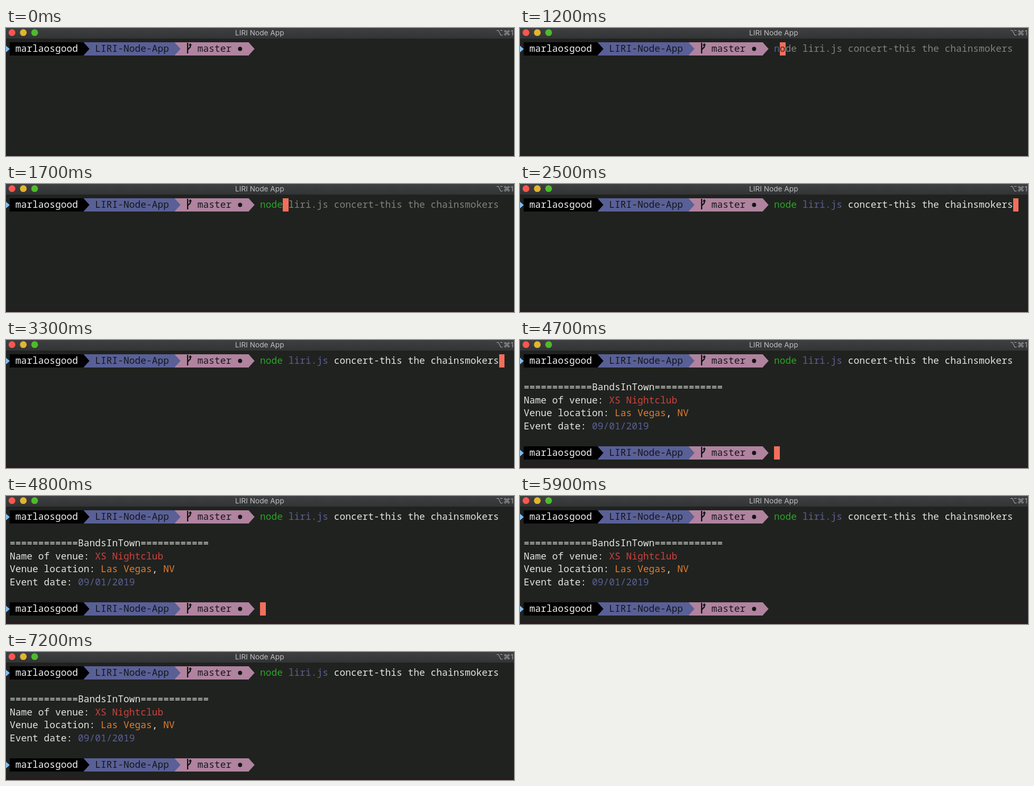
An HTML page with a canvas that plays this animation: 960 px wide and 242 px high, repeating every 7.3 s.

```html
<!DOCTYPE html>
<html lang="en">
<head>
<meta charset="utf-8">
<title>LIRI Node App</title>
<style>
html, body { margin: 0; width: 100%; height: 100%; overflow: hidden; background: #20221f; }
canvas { display: block; }
</style>
</head>
<body>
<canvas id="stage" width="960" height="242"></canvas>
<script>
const g = document.getElementById('stage').getContext('2d');
const LOOP = 7300, LEFT = 7, TOP = 27, CELL = 10.75, ROW = 24.85, INPUT = 44;
const MONO = '17.9px "Noto Sans Mono", "DejaVu Sans Mono", monospace';
const BG = '#20221f', WHITE = '#e4e5e0', GREY = '#80827f', BLUE = '#596096',
  PINK = '#b0839f', GREEN = '#2da32b', RED = '#c9433f', ORANGE = '#e27c2b', CURSOR = '#f16f5d';
const USER = 'marlaosgood';
const COMMAND = 'node liri.js concert-this the chainsmokers';

// [time in ms, characters typed]
const KEYS = [[1200, 1], [1400, 2], [1500, 3], [1600, 4], [1800, 5], [2400, COMMAND.length]];
const ENTER = 3500, OUTPUT = 4700;
const BLINKS = [[0, 100], [600, 1100], [5900, 6400], [6900, LOOP]];

const colX = col => LEFT + col * CELL;
const rowY = row => Math.round(TOP + row * ROW);

function rect(x, y, w, h, color) {
  g.fillStyle = color;
  g.fillRect(x, y, w, h);
}

function dot(x, y, r, color) {
  g.fillStyle = color;
  g.beginPath();
  g.arc(x, y, r, 0, Math.PI * 2);
  g.fill();
}

function triangle(x, y, w, h, color) {
  g.fillStyle = color;
  g.beginPath();
  g.moveTo(x, y);
  g.lineTo(x + w, y + h / 2);
  g.lineTo(x, y + h);
  g.fill();
}

function text(str, col, row, color) {
  g.font = MONO;
  g.textAlign = 'left';
  g.fillStyle = color;
  [...str].forEach((ch, i) => g.fillText(ch, colX(col + i), rowY(row) + 18));
}

// Consecutive [string, color] pieces on one row
function line(row, ...parts) {
  let col = 0;
  for (const [str, color] of parts) {
    text(str, col, row, color);
    col += str.length;
  }
}

function segment(from, to, row, color) {
  const x = Math.round(colX(from)), y = rowY(row);
  rect(x, y, Math.round(colX(to)) - x, rowY(row + 1) - y, color);
}

function branch(x, y) {
  g.strokeStyle = g.fillStyle = '#141414';
  g.lineWidth = 2.4;
  g.beginPath();
  g.moveTo(x + 3, y + 1);
  g.lineTo(x + 3, y + 21);
  g.moveTo(x + 8, y + 5);
  g.lineTo(x + 8, y + 9);
  g.lineTo(x + 3, y + 14);
  g.stroke();
  g.beginPath();
  g.moveTo(x + 4.8, y + 6);
  g.lineTo(x + 8, y + 1.5);
  g.lineTo(x + 11.2, y + 6);
  g.fill();
}

function prompt(row) {
  const y = rowY(row);
  triangle(0, y + 6.5, 7, 12.5, '#7fbdf2');
  segment(0, 13, row, '#000');
  segment(13, 29, row, BLUE);
  segment(29, 42, row, PINK);
  [[13, '#000'], [29, BLUE], [42, PINK]].forEach(([col, color]) =>
    triangle(Math.round(colX(col)), y + 0.5, CELL, ROW - 1, color));
  text(USER, 1, row, '#f2f2f2');
  text('LIRI-Node-App', 15, row, '#15161c');
  branch(colX(31), y);
  text('master', 33, row, '#15161c');
  dot(colX(40.5), y + 12.5, 3.9, '#141414');
}

function command(typed) {
  for (let i = 0; i < COMMAND.length; i++) {
    let color = WHITE;
    if (i >= typed) color = GREY;
    else if (i < 4) color = typed < 4 ? BLUE : GREEN;
    else if (i < 12) color = BLUE;
    text(COMMAND[i], INPUT + i, 0, color);
  }
}

function output() {
  const rule = '='.repeat(12);
  line(2, [rule + 'BandsInTown' + rule, WHITE]);
  line(3, ['Name of venue: ', WHITE], ['XS Nightclub', RED]);
  line(4, ['Venue location: ', WHITE], ['Las Vegas', ORANGE], [', ', WHITE], ['NV', ORANGE]);
  line(5, ['Event date: ', WHITE], ['09/01/2019', BLUE]);
  prompt(7);
}

function titleBar() {
  const shade = g.createLinearGradient(0, 0, 0, 20);
  shade.addColorStop(0, '#3e3f41');
  shade.addColorStop(1, '#333436');
  rect(0, 0, 960, 20, shade);
  ['#f9564f', '#e2b52c', '#4fba2e'].forEach((c, i) => dot(11.3 + i * 21.4, 8.7, 6.4, c));
  g.font = '13.65px Inter, Roboto, sans-serif';
  g.textAlign = 'center';
  g.fillStyle = '#bebfc0';
  g.fillText('LIRI Node App', 479.3, 14);
  g.textAlign = 'right';
  g.fillStyle = '#a2a3a4';
  g.fillText('⌥⌘1', 959, 14);
}

function cursor(t, typed) {
  if (BLINKS.some(([off, on]) => t >= off && t < on)) return;
  let col = INPUT + typed, row = 0;
  if (t >= OUTPUT) [col, row] = [INPUT, 7];
  else if (t >= ENTER) [col, row] = [0, 1];
  segment(col, col + 1, row, CURSOR);
  if (row === 0 && typed > 0 && typed < COMMAND.length) text(COMMAND[typed], col, 0, '#3a2521');
}

function draw(now) {
  const t = now % LOOP;
  const typed = KEYS.reduce((n, [at, count]) => t >= at ? count : n, 0);
  rect(0, 0, 960, 242, BG);
  rect(0, 238.5, 960, 3.5, '#2b1a22');
  titleBar();
  prompt(0);
  if (typed) command(typed);
  if (t >= OUTPUT) output();
  cursor(t, typed);
}

const start = performance.now();
function tick() {
  draw(performance.now() - start);
  requestAnimationFrame(tick);
}
tick();
</script>
</body>
</html>
```
